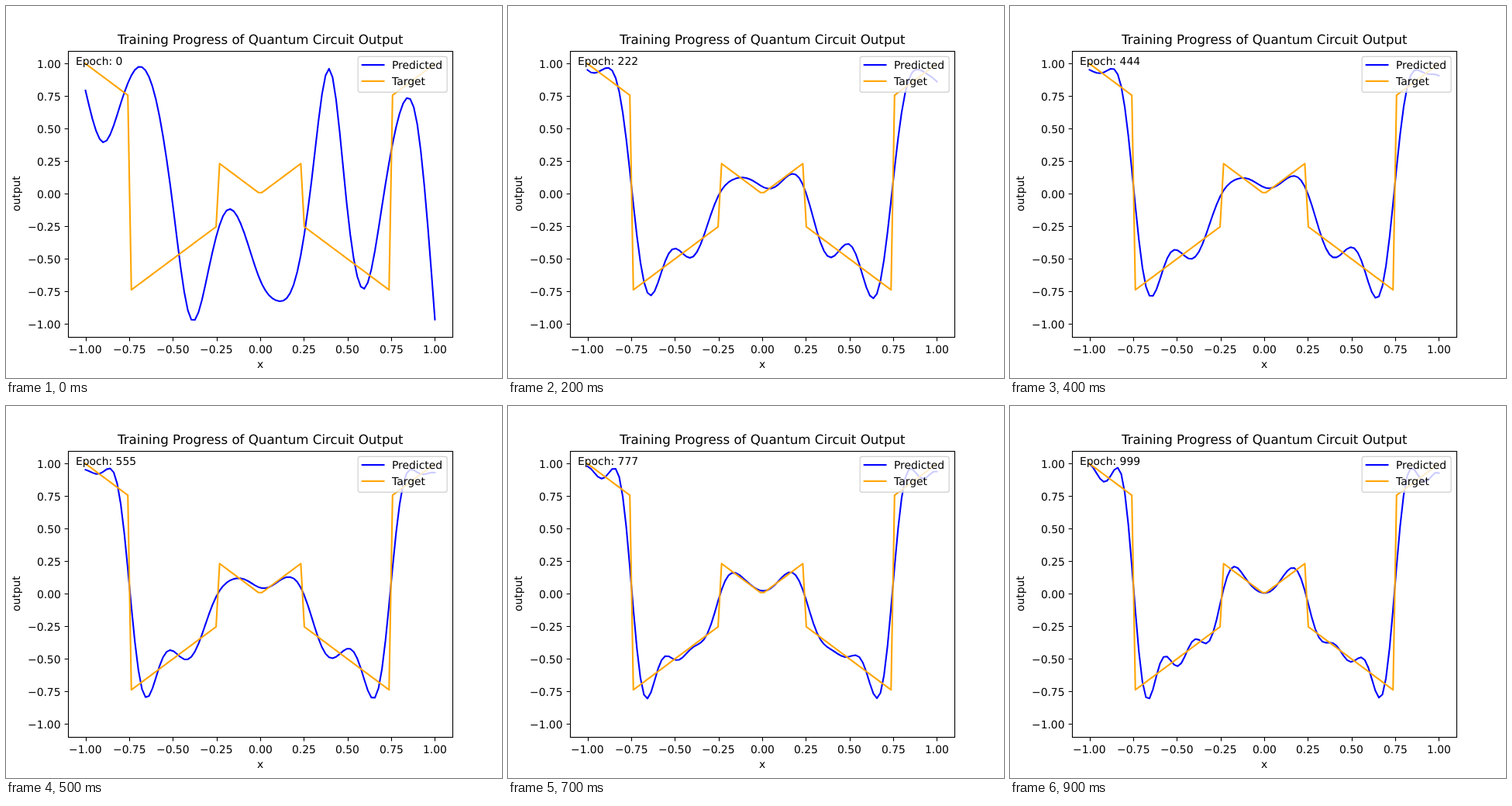
These frames come from a looping animation (640x480 px, 1 s). An HTML page:

```html
<!DOCTYPE html>
<html lang="en">
<head>
<meta charset="utf-8">
<title>Training progress</title>
<style>
  html, body { margin: 0; width: 100%; height: 100%; overflow: hidden; background: #fff; }
  svg { display: block; font: 13.889px "DejaVu Sans", sans-serif; text-rendering: geometricPrecision; }
  .curve { fill: none; stroke-width: 2.083; stroke-linejoin: round; stroke-linecap: square; }
  .blue { stroke: #00f; }
  .orange { stroke: #ffa500; }
  .axis { fill: none; stroke: #000; stroke-width: 1.11; }
  .title { font-size: 16.667px; }
</style>
</head>
<body>
<svg width="640" height="480" viewBox="0 0 640 480">
  <path id="predicted" class="curve blue"/>
  <path id="target" class="curve orange"/>
  <path id="ticks" class="axis"/>
  <rect class="axis" x="80.5" y="58.5" width="496" height="369"/>
  <g id="labels"></g>
  <text id="epoch" x="90" y="76"></text>
  <rect x="454.2" y="65.2" width="115" height="46" rx="2.8" fill="#fff" stroke="#ccc" stroke-width="1.39" opacity=".8"/>
  <path class="curve blue" d="M459.7 76h27.8"/>
  <path class="curve orange" d="M459.7 97h27.8"/>
  <text x="498" y="81">Predicted</text>
  <text x="498" y="102">Target</text>
</svg>
<script>
const { PI, sin, cos, abs, round, floor } = Math;
const el = id => document.getElementById(id);
const px = x => 328 + 225.4545 * x;
const py = y => 242.4 - 168 * y;
const SAMPLES = 100, STEPS = 10, STEP_MS = 100;

const plot = f => 'M' + Array.from({ length: SAMPLES }, (_, i) => {
  const x = 2 * i / (SAMPLES - 1) - 1;
  return px(x).toFixed(2) + ' ' + py(f(x)).toFixed(2);
}).join('L');

// Natural cubic spline through evenly spaced values on [-1, 1]
function spline(y) {
  const n = y.length, m = Array(n).fill(0);
  for (let pass = 0; pass < 40; pass++)
    for (let k = 1; k < n - 1; k++)
      m[k] = (6 * (y[k + 1] - 2 * y[k] + y[k - 1]) - m[k - 1] - m[k + 1]) / 4;
  return x => {
    const s = (x + 1) / 2 * (n - 1), k = Math.min(floor(s), n - 2), b = s - k, a = 1 - b;
    return a * y[k] + b * y[k + 1] + ((a ** 3 - a) * m[k] + (b ** 3 - b) * m[k + 1]) / 6;
  };
}

const harmonics = (x, ...amps) => amps.reduce((sum, a, k) => sum + a * cos((k + 1) * PI * x), 0);
const sway = x => sin(7.5 * PI * x) * cos(PI * x / 2);
const ripple = x => cos(10 * PI * x) * sin(PI * x);
const edge = x => x ** 31;
const mix = (f, g, t) => x => f(x) * (1 - t) + g(x) * t;

const target = x => abs(x) > 0.25 && abs(x) < 0.75 ? -abs(x) : abs(x);

const untrained = spline([0.794, 0.396, 0.687, 0.973, 0.743, -0.087, -0.953, -0.611, -0.14, -0.268, -0.664,
  -0.822, -0.661, 0.169, 0.955, -0.135, -0.724, -0.069, 0.627, 0.526, -0.965]);
const early = x => harmonics(x, -0.284, 0.631, -0.243, -0.003, 0.066, -0.195, 0.059, 0.044, -0.016)
  - 0.036 * sway(x) - 0.056 * edge(x);
const middle = x => harmonics(x, -0.296, 0.637, -0.247, -0.003, 0.069, -0.203, 0.093, 0.034, -0.06, 0.034, -0.014)
  - 0.012 * sway(x);
const trained = x => harmonics(x, -0.291, 0.632, -0.24, -0.008, 0.069, -0.22, 0.061, -0.008, -0.063, 0.1, -0.015, -0.011)
  - 0.017 * ripple(x) - 0.036 * edge(x);

// Jump from untrained to early, drift to middle, then ease out to trained
function prediction(step) {
  if (step === 0) return untrained;
  if (step <= 6) return mix(early, middle, (step - 1) / 5);
  return mix(middle, trained, 1 - ((9 - step) / 3) ** 2);
}

// Text starting on a whole pixel; align is 0 left, 0.5 centre, 1 right
function label(str, x, y, align = 0.5, type = '') {
  const t = document.createElementNS('http://www.w3.org/2000/svg', 'text');
  t.textContent = str;
  t.setAttribute('class', type);
  el('labels').append(t);
  const shift = align * t.getComputedTextLength();
  t.setAttribute('transform', type === 'upright'
    ? `translate(${x} ${round(y + shift)}) rotate(-90)`
    : `translate(${round(x - shift)} ${round(y)})`);
}

label('Training Progress of Quantum Circuit Output', 328, 49, 0.5, 'title');
label('x', 328, 467);
label('output', 18, 242.4, 0.5, 'upright');

let ticks = '';
for (let v = -1; v <= 1; v += 0.25) {
  const name = v.toFixed(2).replace('-', '\u2212');
  ticks += `M${round(px(v)) + 0.5} 427.5v4.9M80.5 ${round(py(v)) + 0.5}h-4.9`;
  label(name, px(v), 448);
  label(name, 71, py(v) + 5.2, 1);
}
el('ticks').setAttribute('d', ticks);
el('target').setAttribute('d', plot(target));

const curves = Array.from({ length: STEPS }, (_, step) => plot(prediction(step)));

function draw() {
  const step = floor(performance.now() / STEP_MS) % STEPS;
  el('predicted').setAttribute('d', curves[step]);
  el('epoch').textContent = 'Epoch: ' + 111 * step;
  requestAnimationFrame(draw);
}
draw();
</script>
</body>
</html>
```
